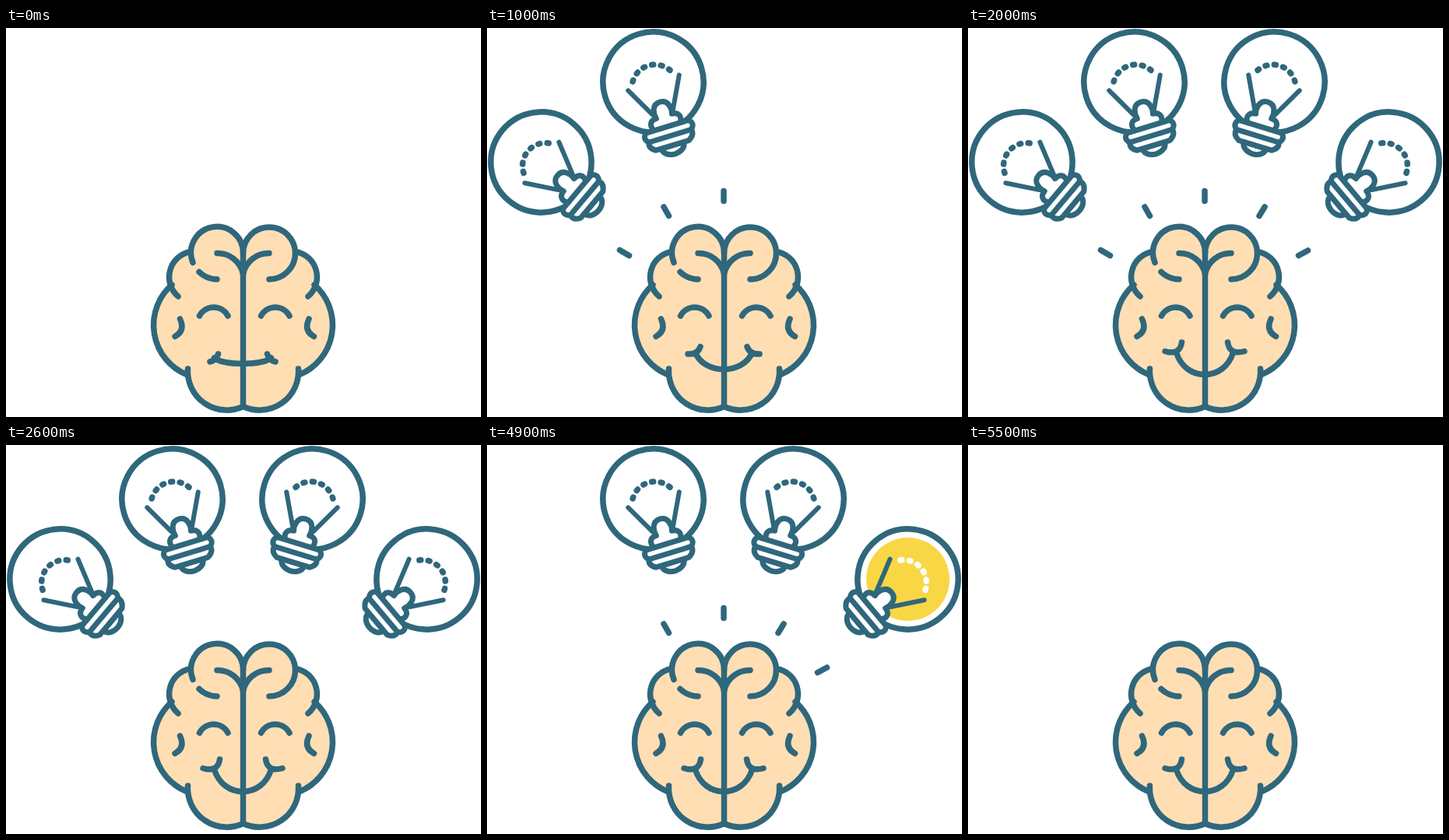
Animation of 610x500 px, one loop 5700 ms. Source, as an HTML page:

```html
<!DOCTYPE html>
<html lang="en">
<head>
<meta charset="utf-8">
<title>Bright idea</title>
<style>
  html, body { margin: 0; width: 100%; height: 100%; overflow: hidden; background: #fff; }
  svg { display: block; width: 610px; height: 500px; }
  .line { fill: none; stroke: #2f677c; stroke-width: 7.5; stroke-linecap: round; stroke-linejoin: round; }
  .thin { stroke-width: 6; }
  .base { stroke-width: 7; }
  .skin { fill: #ffdeb4; }
  .white { fill: #fff; }
  .glow { fill: #f9d644; }
</style>
</head>
<body>
<svg viewBox="0 0 610 500">
  <defs>
    <circle id="bulb-back" class="line white" r="64.6"/>
    <g id="bulb-front" class="line base">
      <path class="thin" d="M-34 1L-13 40M34.5 1L13.5 42"/>
      <path class="white" d="M-17 60C-22 52 -18 46 -10 46C-12 40 -11 27 0.5 27C12 27 13 40 11 46C19 46 23 52 18 60"/>
      <path class="white" d="M-15 85C-15 92 -8 96.500 0 96.500C8 96.500 15 92 15 85Z"/>
      <path class="white" d="M-28 60H29Q36 66 29 72.500Q31 80 22 85H-22Q-31 80 -28 72.500Q-35 66 -28 60Z"/>
      <path d="M-28 72.500H29"/>
    </g>
    <g id="half-fill" class="skin">
      <circle cx="271" cy="289.5" r="33.5"/>
      <circle cx="243.5" cy="320.5" r="33"/>
      <circle cx="258.5" cy="381" r="69"/>
      <circle cx="283.5" cy="441.5" r="50"/>
      <path d="M258 290H305V480H258Z"/>
    </g>
    <g id="half-line" class="line">
      <path d="M271 289.5A33.5 33.5 0 0 1 304.5 316"/>
      <path d="M237 287.5A33 33 0 0 0 221 345"/>
      <path d="M213 330A69 69 0 0 0 232 445.5"/>
      <path d="M233.5 438A50 50 0 0 0 304.5 486.5"/>
    </g>
    <g id="half-face" class="line">
      <path d="M248.5 370A20.6 20.6 0 0 1 285 370"/>
      <path d="M223.5 374Q230.5 389 217 396.5"/>
    </g>
  </defs>

  <g id="bulbs"></g>
  <g id="rays" class="line"></g>

  <use href="#half-fill"/>
  <use href="#half-fill" transform="translate(609) scale(-1 1)"/>
  <use href="#half-line"/>
  <use href="#half-line" transform="translate(609) scale(-1 1)"/>
  <use href="#half-face"/>
  <use href="#half-face" transform="translate(612.5) scale(-1 1)"/>
  <g class="line">
    <path d="M240 301.5A33.5 33.5 0 1 1 304.5 289.5V486"/>
    <path d="M248 313.5A33.5 33.5 0 0 0 271 323"/>
    <path d="M304.5 289.5A33.5 33.5 0 1 1 338 323"/>
    <path id="smile"/>
  </g>
</svg>
<script>
  const LOOP = 5700;
  const NS = 'http://www.w3.org/2000/svg';
  const $ = id => document.getElementById(id);

  function add(parent, tag, attrs) {
    const el = document.createElementNS(NS, tag);
    for (const key in attrs) el.setAttribute(key, attrs[key]);
    return parent.appendChild(el);
  }

  const show = (el, on) => { el.style.display = on ? '' : 'none'; };

  // Six short dashes spread along an arc above the filament.
  function filament() {
    let d = '';
    for (let i = 0; i < 6; i++) {
      const a = (i - 2.5) * 22.4 * Math.PI / 180;
      const x = 29.5 * Math.sin(a), y = 7.4 - 29.5 * Math.cos(a);
      const ux = Math.cos(a), uy = Math.sin(a);
      d += `M${x - ux} ${y - uy}L${x + ux} ${y + uy}`;
    }
    return d;
  }

  function makeBulb([x, y, angle, flip]) {
    const transform = `translate(${x} ${y}) scale(${flip} 1) rotate(${-angle})`;
    const root = add($('bulbs'), 'g', { transform });
    add(root, 'use', { href: '#bulb-back' });
    const glow = add(root, 'circle', { class: 'glow', r: 53.5 });
    const dots = add(root, 'path', { class: 'line', d: filament() });
    add(root, 'use', { href: '#bulb-front' });
    return { root, glow, dots };
  }

  const bulbs = [
    [69.5, 172.5, 50, 1],
    [213.5, 69.5, 17, 1],
    [393.5, 69.5, 17, -1],
    [540.5, 172.5, 50, -1]
  ].map(makeBulb);

  // One set of rays per bulb.
  const rays = [
    'M170.5 285.5L182.5 292.5',
    'M227 230L233.5 241.5M304 209.5V222.5',
    'M381 230L374 241.5',
    'M436.5 286L424.5 292.5'
  ].map(d => add($('rays'), 'path', { d }));

  // Cheek start, control and end, then mouth corner height and depth.
  const smiles = [
    [262, 429, 270.5, 427, 272.5, 419, 424, 10],
    [260, 424, 270.5, 423.5, 273, 414, 420, 20.5],
    [258, 419, 270.5, 420, 274, 409.5, 417, 29],
    [255.5, 417, 271, 420.5, 274.3, 407, 417, 33.5],
    [253, 415.5, 272, 421, 274.5, 404, 417, 38]
  ];

  function smilePath([x1, y1, x2, y2, x3, y3, top, depth]) {
    const low = top + depth;
    return `M${x1} ${y1}Q${x2} ${y2} ${x3} ${y3}` +
      `M${608 - x1} ${y1}Q${608 - x2} ${y2} ${608 - x3} ${y3}` +
      `M267.5 ${top}C279 ${low} 329 ${low} 340.5 ${top}`;
  }

  function draw(t) {
    const blinkOff = t >= 2500 && t < 2900 && Math.floor((t - 2500) / 100) % 2 === 1;
    const lit = t >= 2500 && !blinkOff;
    bulbs.forEach((bulb, i) => {
      const on = t >= 500 * (i + 1) && t < 4900 + 200 * i;
      const bright = lit && i === 3;
      show(bulb.root, on);
      show(bulb.glow, bright);
      bulb.dots.style.stroke = bright ? '#fff' : '';
      show(rays[i], on && !blinkOff);
    });
    $('smile').setAttribute('d', smilePath(smiles[Math.min(4, Math.floor(t / 500))]));
  }

  const start = performance.now();
  function tick() {
    draw((performance.now() - start) % LOOP);
    requestAnimationFrame(tick);
  }
  tick();
</script>
</body>
</html>
```
